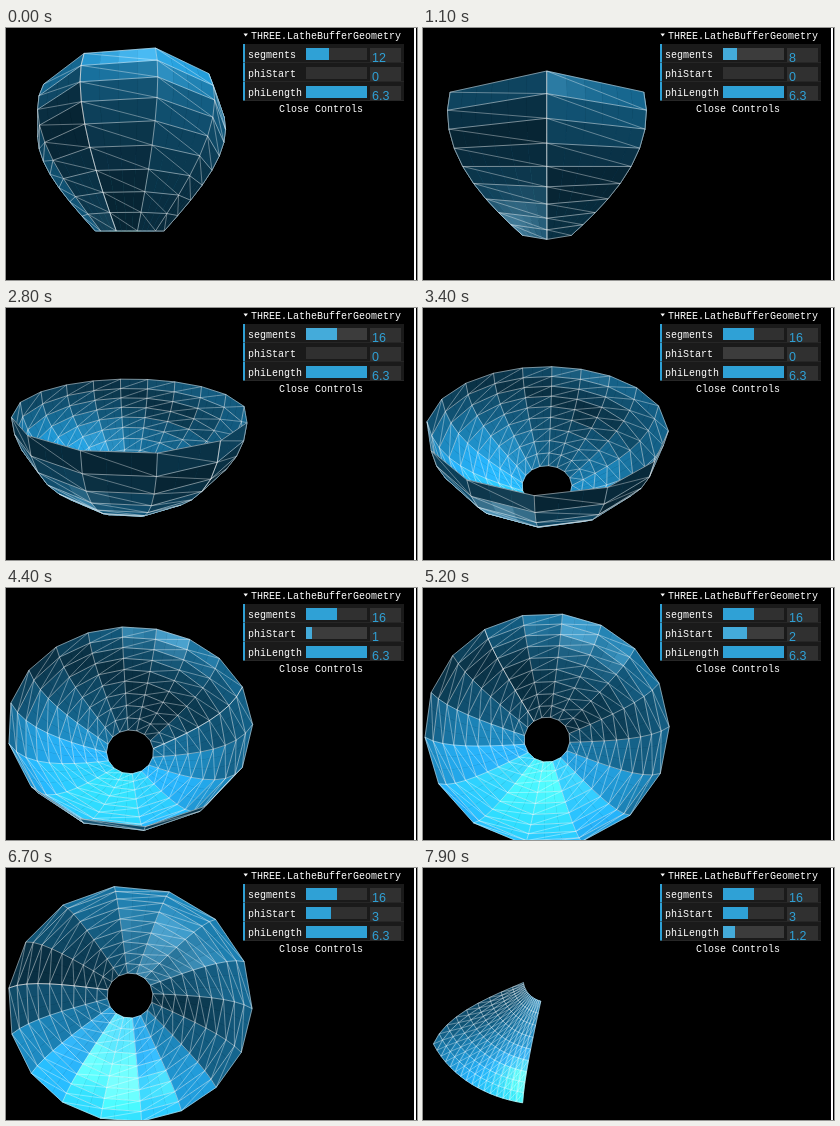
Write an HTML page with a canvas that moves like this. It is 411 px wide and 252 px high and loops after 8000 ms.

```html
<!DOCTYPE html>
<html lang="en">
<head>
<meta charset="utf-8">
<title>Lathe geometry</title>
<style>
  html, body { margin: 0; width: 100%; height: 100%; overflow: hidden; background: #000; }
  canvas, svg { position: absolute; left: 0; top: 0; width: 411px; height: 252px; }
  text { font: 10px "Liberation Mono", "DejaVu Sans Mono", monospace; fill: #fff; white-space: pre; }
  .value { font: 12.5px "Liberation Sans", Arial, sans-serif; fill: #2fa1d6; }
</style>
</head>
<body>
<canvas id="stage"></canvas>
<svg id="gui" viewBox="0 0 411 252">
  <rect x="408" width="2" height="252" fill="#fff"/>
  <rect x="237" width="161" height="15" fill="#000"/>
  <path d="M237.5 5.5h4.4l-2.2 3z" fill="#fff"/>
  <text x="245" y="10.5">THREE.LatheBufferGeometry</text>
  <g id="rows"></g>
  <text x="273" y="83.5">Close Controls</text>
</svg>
<script>
const LOOP = 8000, STEP = 100;
const CENTER = { x: 124, y: 138.6 }, FOCAL = 182, CAMERA_Z = 30;
const COLOR = [21, 98, 137], EMISSIVE = [7, 37, 52];
const SPECULAR = 0x11 / 255, SHININESS = 30;
const LIGHTS = [[0, 200, 0], [100, 200, 100], [-100, -200, -100]];
const PROFILE = Array.from({ length: 10 }, (_, i) => ({ r: Math.sin(i * 0.2) * 10 + 5, y: (i - 5) * 2 }));

// Keyframes: [seconds, value]
const ANGLE = [[0, -0.342], [2.1, 0.308], [3.4, 0.72], [4.4, 1.04], [5.2, 1.3], [6.7, 1.8], [7.9, 2.13]];
const SEGMENTS = [[0.3, 12], [1.6, 6], [2.2, 6], [2.7, 16]];
const PHI_START = [[3.7, 0], [4.2, 0.62], [4.6, 0.62], [5.1, 2.475], [5.7, 2.475], [6, 2.63]];
const PHI_LENGTH = [[7.2, 2 * Math.PI], [7.8, 1.24]];

function track(keys, t) {
  if (t <= keys[0][0]) return keys[0][1];
  for (let i = 1; i < keys.length; i++) {
    const [t0, v0] = keys[i - 1], [t1, v1] = keys[i];
    if (t <= t1) return v0 + (v1 - v0) * (t - t0) / (t1 - t0);
  }
  return keys[keys.length - 1][1];
}

const sub = (a, b) => a.map((v, i) => v - b[i]);
const add = (a, b) => a.map((v, i) => v + b[i]);
const scale = (a, k) => a.map(v => v * k);
const dot = (a, b) => a[0] * b[0] + a[1] * b[1] + a[2] * b[2];
const unit = a => scale(a, 1 / Math.hypot(...a));
const mix = (a, b, k) => a.map((v, i) => v + (b[i] - v) * k);
const cross = (a, b) => [a[1] * b[2] - a[2] * b[1], a[2] * b[0] - a[0] * b[2], a[0] * b[1] - a[1] * b[0]];

// Flat Blinn-Phong shading at one point
function shade(point, normal) {
  const view = unit(sub([0, 0, CAMERA_Z], point));
  let diffuse = 0, gloss = 0;
  for (const light of LIGHTS) {
    const toLight = unit(sub(light, point));
    const nl = dot(normal, toLight);
    if (nl <= 0) continue;
    const half = unit(add(toLight, view));
    const lh = dot(toLight, half);
    const fresnel = SPECULAR + (1 - SPECULAR) * 2 ** ((-5.55473 * lh - 6.98316) * lh);
    diffuse += nl;
    gloss += nl * fresnel * 0.25 * (SHININESS / 2 + 1) * Math.max(0, dot(normal, half)) ** SHININESS;
  }
  const rgb = COLOR.map((c, i) => Math.min(255, Math.round(EMISSIVE[i] + c * diffuse + 255 * gloss)));
  return `rgb(${rgb})`;
}

const canvas = document.getElementById("stage");
const ratio = window.devicePixelRatio || 1;
canvas.width = 411 * ratio;
canvas.height = 252 * ratio;
const ctx = canvas.getContext("2d");
ctx.scale(ratio, ratio);
ctx.lineJoin = "round";

function project([x, y, z]) {
  const k = FOCAL / (CAMERA_Z - z);
  return [CENTER.x + x * k, CENTER.y - y * k];
}

function addLine(path, points) {
  points.forEach((p, i) => path[i ? "lineTo" : "moveTo"](...project(p)));
}

function makeLayer() {
  return { faces: [], edges: new Path2D(), diagonals: new Path2D(), seen: new Set() };
}

// Neighbouring faces share edges, and a translucent line must be laid only once
function addEdge(layer, from, to) {
  for (const [p, q] of [[from, to], [to, from]]) {
    const key = [...p, ...q].join();
    if (layer.seen.has(key)) return;
    layer.seen.add(key);
  }
  addLine(layer.edges, [from, to]);
}

function drawLathe(angle, segments, phiStart, phiLength) {
  const cos = Math.cos(angle), sin = Math.sin(angle);
  const ring = i => {
    const phi = phiStart + i / segments * phiLength + angle;
    return PROFILE.map(({ r, y }) => {
      const z = r * Math.cos(phi);
      return [r * Math.sin(phi), y * cos - z * sin, y * sin + z * cos];
    });
  };
  const rings = Array.from({ length: segments + 1 }, (_, i) => ring(i));
  const inner = makeLayer(), outer = makeLayer();
  const slices = Math.ceil(48 / segments);

  for (let i = 0; i < segments; i++) {
    for (let j = 0; j < PROFILE.length - 1; j++) {
      const a = rings[i][j], b = rings[i + 1][j], c = rings[i + 1][j + 1], d = rings[i][j + 1];
      let normal = unit(cross(sub(b, a), sub(d, a)));
      const facing = dot(normal, sub([0, 0, CAMERA_Z], a)) > 0;
      if (!facing) normal = scale(normal, -1);
      const layer = facing ? outer : inner;
      for (let s = 0; s < slices; s++) {
        const k0 = s / slices, k1 = (s + 1) / slices;
        const quad = [mix(a, b, k0), mix(a, b, k1), mix(d, c, k1), mix(d, c, k0)];
        const middle = mix(mix(quad[0], quad[2], 0.5), mix(quad[1], quad[3], 0.5), 0.5);
        layer.faces.push({ quad, fill: shade(middle, normal) });
      }
      for (const [from, to] of [[a, b], [b, c], [c, d], [d, a]]) addEdge(layer, from, to);
      addLine(layer.diagonals, [b, d]);
    }
  }

  // The surface is convex, so the inside never covers the outside
  for (const { faces, edges, diagonals } of [inner, outer]) {
    ctx.lineWidth = 0.6;
    for (const { quad, fill } of faces) {
      const path = new Path2D();
      addLine(path, quad);
      path.closePath();
      ctx.fillStyle = ctx.strokeStyle = fill;
      ctx.fill(path);
      ctx.stroke(path);
    }
    ctx.lineWidth = 0.9;
    ctx.strokeStyle = "rgba(255,255,255,.4)";
    ctx.stroke(diagonals);
    ctx.strokeStyle = "rgba(255,255,255,.5)";
    ctx.stroke(edges);
  }
}

function node(parent, tag, attrs, text = "") {
  const el = document.createElementNS("http://www.w3.org/2000/svg", tag);
  for (const key in attrs) el.setAttribute(key, attrs[key]);
  el.textContent = text;
  return parent.appendChild(el);
}

function makeRow(label, index) {
  const group = node(document.getElementById("rows"), "g", { transform: `translate(237 ${16 + index * 19})` });
  node(group, "rect", { width: 161, height: 18, fill: "#1a1a1a" });
  node(group, "rect", { y: 18, width: 161, height: 1, fill: "#262626" });
  node(group, "rect", { width: 2, height: 18.5, fill: "#2fa1d6" });
  node(group, "text", { x: 5, y: 14 }, label);
  const back = node(group, "rect", { x: 63, y: 4, width: 61, height: 12 });
  const bar = node(group, "rect", { x: 63, y: 4, height: 12 });
  node(group, "rect", { x: 127, y: 4, width: 31, height: 14, fill: "#303030" });
  const value = node(group, "text", { x: 129, y: 18, class: "value" });
  return (fraction, shown, hover) => {
    back.setAttribute("fill", hover ? "#3c3c3c" : "#303030");
    bar.setAttribute("fill", hover ? "#44abda" : "#2fa1d6");
    bar.setAttribute("width", Math.floor(61 * fraction));
    value.textContent = shown;
  };
}

const [segmentsRow, startRow, lengthRow] = ["segments", "phiStart", "phiLength"].map(makeRow);

function render(t) {
  const segments = Math.round(track(SEGMENTS, t));
  const phiStart = track(PHI_START, t);
  const phiLength = track(PHI_LENGTH, t);
  ctx.fillStyle = "#000";
  ctx.fillRect(0, 0, 411, 252);
  drawLathe(track(ANGLE, t), segments, phiStart, phiLength);
  segmentsRow((segments - 1) / 29, segments, t > 0.2 && t < 2.95);
  startRow(phiStart / (2 * Math.PI), Math.round(phiStart), t > 2.95 && t < 6.25);
  lengthRow(phiLength / (2 * Math.PI), phiLength.toFixed(1), t > 6.95);
}

const origin = performance.now();
function tick() {
  const elapsed = (performance.now() - origin) % LOOP;
  render(Math.floor(elapsed / STEP) * STEP / 1000);
  requestAnimationFrame(tick);
}
tick();
</script>
</body>
</html>
```
